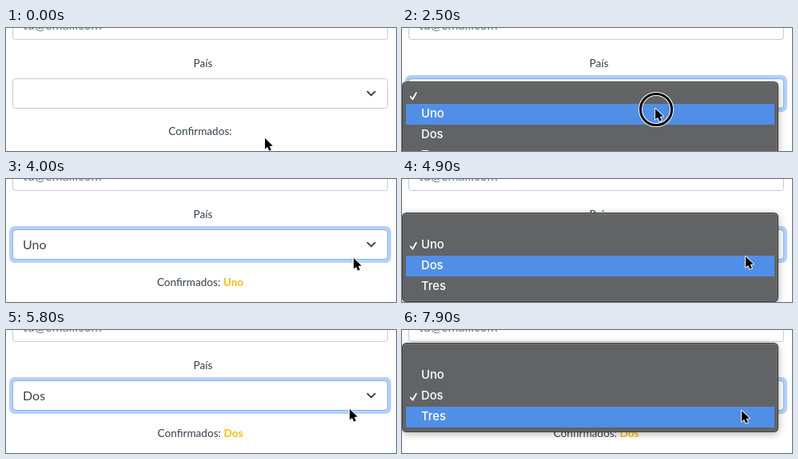
An HTML page that plays this animation: 488 by 154 pixels, repeating every 8000 ms.

```html
<!DOCTYPE html>
<html lang="es">
<head>
<meta charset="utf-8">
<title>País</title>
<style>
  html, body { margin: 0; width: 488px; height: 154px; overflow: hidden; background: #fff; }
  svg { display: block; }
  .form { font: 16px Lato, sans-serif; fill: #3c444c; }
  .label { font-size: 13.6px; fill: #34404c; text-anchor: middle; }
  .hint { fill: #6c757d; }
  .result { font-weight: 700; fill: #fdbb14; }
  .box { fill: #fff; stroke: #c8cad8; }
  .menu { font: 500 14.8px Inter, sans-serif; fill: #fff; }
  .panel { filter: drop-shadow(0 2px 5px rgba(0, 0, 0, .3)); }
  .line { fill: none; stroke-linecap: round; stroke-linejoin: round; }
</style>
</head>
<body>
<svg width="488" height="154" viewBox="0 0 488 154">
  <g class="form">
    <rect class="box" x="8.5" y="-23.5" width="469" height="38" rx="3.5"/>
    <text class="hint" x="21" y="1.6">tu@email.com</text>
    <text class="label" x="246.5" y="48.5">País</text>
    <rect id="ring" x="4" y="59" width="478" height="46" rx="7" fill="#b5d2fa"/>
    <rect class="box" x="8.5" y="63.5" width="469" height="37" rx="3.5"/>
    <rect id="edge" x="8.5" y="63.5" width="469" height="37" rx="3.5" fill="none" stroke="#84b5f5"/>
    <text id="value" x="21" y="87.5"></text>
    <path class="line" d="M452.3 79.7l4.7 4.7 4.7-4.7" stroke="#343a40" stroke-width="1.9"/>
    <text class="label" x="243" y="134">Confirmados: <tspan id="result" class="result"></tspan></text>
  </g>

  <g id="menu" class="menu">
    <g class="panel">
      <rect x="0" y="0" width="471" height="112" rx="5.5" fill="#3a3b3c"/>
      <rect x="1" y="1" width="469" height="110" rx="4.5" fill="#77787a"/>
      <rect x="1.5" y="2" width="468" height="108.5" rx="4" fill="#626365"/>
    </g>
    <rect id="bar" x="5" width="461" fill="#518fe6"/>
    <g id="items"></g>
    <path id="tick" class="line" d="M10.7 1.5l2.6 3.3 4.5-8" stroke="#fff" stroke-width="1.8"/>
  </g>

  <g id="pointer">
    <g id="click" class="line" transform="translate(1 1)">
      <circle r="19.6" stroke="#fff" stroke-width="5"/>
      <circle r="19.6" stroke="#000" stroke-width="3"/>
    </g>
    <path d="M0 0V13.6L3.1 10.9 5.3 15.8 7.9 14.6 5.7 9.9 9.8 9.6Z"
          fill="#000" stroke="#fff" stroke-width="1.8" stroke-linejoin="round" paint-order="stroke"/>
  </g>
</svg>
<script>
  const LOOP = 8000, STEP = 100;
  const $ = id => document.getElementById(id);
  const names = ['', 'Uno', 'Dos', 'Tres'];
  const rowTop = [6, 28, 54, 80];
  const rowHeight = [23, 26, 26, 26];

  // time, x, y of the pointer tip
  const path = [
    [0, 324, 138], [100, 324, 136], [300, 324, 123], [600, 323, 99], [900, 323, 87], [1100, 323, 85],
    [1800, 323, 85], [2000, 320, 92], [2200, 317, 101],
    [2600, 317, 101], [2700, 350, 100], [2800, 410, 101], [2900, 440, 101],
    [3000, 440, 101], [3100, 439, 102], [3900, 439, 102], [4000, 435, 99], [4200, 432, 88],
    [4700, 432, 88], [4800, 431, 92], [4900, 430, 97], [5000, 430, 99],
    [6300, 430, 99], [6600, 425, 88], [7300, 425, 88], [7700, 425, 101], [LOOP, 425, 101]
  ];

  // each opening of the list: selected row, panel top, times, fade after the pick
  const openings = [
    { row: 0, pick: 1, top: 67, open: 1300, press: 2500, fade: [.5] },
    { row: 1, pick: 2, top: 42, open: 4300, press: 5300, fade: [.6, .2] },
    { row: 2, pick: 3, top: 16, open: 7000, press: LOOP, fade: [] }
  ];

  names.forEach((name, i) => {
    const text = document.createElementNS('http://www.w3.org/2000/svg', 'text');
    text.setAttribute('x', 24);
    text.setAttribute('y', rowTop[i] + 17.4);
    text.textContent = name;
    $('items').append(text);
  });

  const set = (id, attrs) => {
    for (const key in attrs) $(id).setAttribute(key, attrs[key]);
  };
  const within = (t, start, length) => t >= start && t < start + length;

  function pointerAt(t) {
    const i = path.findIndex(p => p[0] > t);
    const [t0, x0, y0] = path[i - 1], [t1, x1, y1] = path[i];
    const k = (t - t0) / (t1 - t0);
    return [x0 + (x1 - x0) * k, y0 + (y1 - y0) * k];
  }

  function drawMenu(t, y) {
    const list = openings.find(o => within(t, o.open, o.press + 300 + o.fade.length * STEP - o.open));
    $('menu').style.display = list ? '' : 'none';
    if (!list) return;
    const { row, pick, top, press, fade } = list;
    const hover = t >= press ? pick : y >= top + rowTop[pick] ? pick : row;
    const blink = within(t, press + 100, STEP);
    const fadeStep = (t - press - 300) / STEP;
    set('menu', { transform: `translate(0 ${top})`, opacity: fadeStep >= 0 ? fade[fadeStep] : 1 });
    set('bar', { y: rowTop[hover], height: rowHeight[hover], opacity: blink ? 0 : 1 });
    set('tick', { transform: `translate(0 ${rowTop[row] + rowHeight[row] / 2})` });
  }

  function draw(t) {
    const [x, y] = pointerAt(t);
    set('pointer', { transform: `translate(${x} ${y})` });

    const clicked = openings.some(o => within(t, o.open, 200) || within(t, o.press, 200));
    set('click', { opacity: clicked ? 1 : 0 });

    const focus = Math.min(1, Math.max(0, (t - 1300) / 200));
    set('ring', { opacity: focus });
    set('edge', { opacity: focus });

    const picked = names[openings.filter(o => t >= o.press + 300).length];
    $('value').textContent = $('result').textContent = picked;
    drawMenu(t, y);
  }

  const start = performance.now();
  function tick() {
    const t = Math.max(0, performance.now() - start) % LOOP;
    draw(Math.floor(t / STEP) * STEP);
    requestAnimationFrame(tick);
  }
  tick();
</script>
</body>
</html>
```
